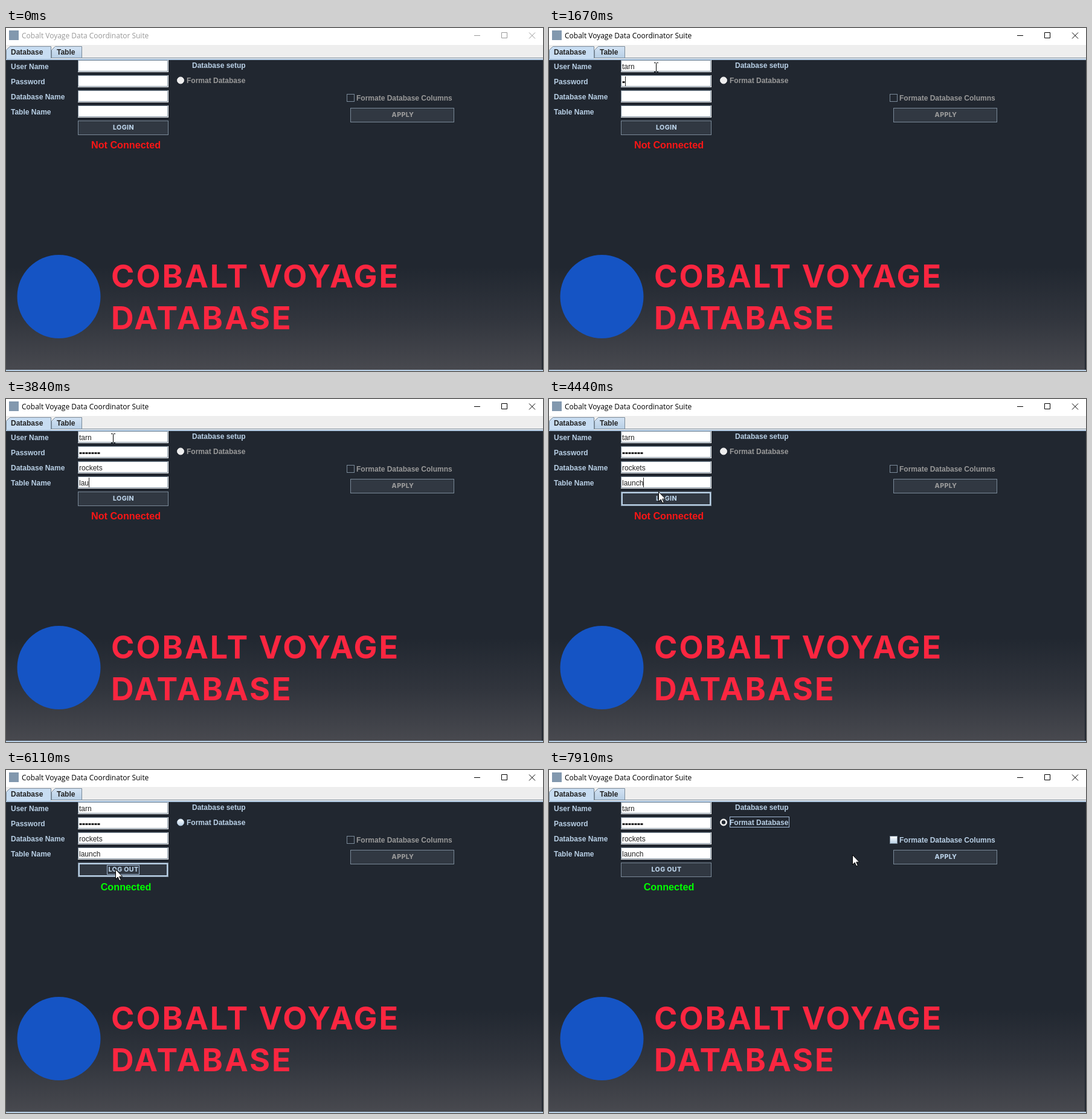
Animation of 889x567 px, one loop 7990 ms. Source, as an HTML page:

```html
<!DOCTYPE html>
<html lang="en">
<head>
<meta charset="utf-8">
<title>Database login</title>
<style>
html, body { margin: 0; width: 100%; height: 100%; overflow: hidden; background: #212730; }
svg { display: block; width: 889px; height: 567px; font: bold 12px "Liberation Sans", Arial, sans-serif; }
text { white-space: pre; }
.title { font: 12px "Open Sans", "Noto Sans", sans-serif; }
.label { fill: #b8cfe5; }
.input { font-weight: normal; fill: #222; }
.status { font-size: 16.2px; text-anchor: middle; }
.face { font: 800 10.6px Inter, sans-serif; letter-spacing: .4px; text-anchor: middle; fill: #b8cfe5; }
.brand { font: 700 52px Inter, sans-serif; letter-spacing: 3px; fill: #fb2640; }
.line { fill: none; stroke: #7a8a99; }
.ring { fill: none; stroke: #a3bad6; }
.box { fill: #313842; stroke: #7a8a99; }
.off { fill: #999; }
</style>
</head>
<body>
<svg viewBox="0 0 889 567">
  <defs>
    <linearGradient id="floor" x1="0" y1="0" x2="0" y2="1">
      <stop offset="0" stop-color="#212730"/><stop offset=".5" stop-color="#31353d"/><stop offset="1" stop-color="#48494f"/>
    </linearGradient>
    <linearGradient id="tab" x1="0" y1="0" x2="0" y2="1">
      <stop offset="0" stop-color="#d3e3f4"/><stop offset="1" stop-color="#b8cfe5"/>
    </linearGradient>
    <linearGradient id="knob" x1="0" y1="0" x2="0" y2="1">
      <stop offset="0" stop-color="#fff"/><stop offset="1" stop-color="#b8cfe5"/>
    </linearGradient>
  </defs>

  <!-- window frame -->
  <rect width="889" height="28" fill="#fff"/>
  <rect x="5" y="4" width="16" height="16" fill="#8298ae"/>
  <g id="chrome">
    <text class="title" x="26" y="17" fill="currentColor">Cobalt Voyage Data Coordinator Suite</text>
    <path d="M775 12.5h10M820.5 7.5h9v9h-9zM866 7.5l10 10M876 7.5l-10 10" fill="none" stroke="currentColor"/>
  </g>

  <!-- tabs -->
  <rect y="28" width="889" height="25" fill="#eee"/>
  <path d="M75.5 49.5V36.5l6-6h44v19z" fill="url(#tab)" stroke="#7a8a99"/>
  <rect y="50" width="889" height="1" fill="#fff"/>
  <rect x="75" y="49" width="814" height="1" fill="#7a8a99"/>
  <rect y="51" width="889" height="2" fill="#a9c3de"/>
  <path d="M.5 51V36.5l6-6h68V51z" fill="#c8ddf2"/>
  <path class="line" d="M.5 51V36.5l6-6h68V50"/>
  <text x="8" y="44" fill="#222">Database</text>
  <text x="84" y="44" fill="#222">Table</text>

  <!-- panel -->
  <rect y="53" width="889" height="514" fill="#212730"/>
  <rect y="395" width="887" height="170" fill="url(#floor)"/>
  <rect y="565" width="889" height="2" fill="#b8cfe5"/>
  <circle cx="87.5" cy="444" r="69" fill="#1554c4"/>
  <text class="brand" x="174" y="429">COBALT VOYAGE</text>
  <text class="brand" x="174" y="498">DATABASE</text>

  <g id="form"></g>
  <path id="dots" fill="none" stroke="#222" stroke-width="3" stroke-dasharray="4 1"/>
  <rect id="caret" width="1" height="16" fill="#222"/>

  <g>
    <rect id="login" class="box" x="119.5" y="153.5" width="149" height="23"/>
    <g id="glow" fill="none">
      <rect x="121" y="155" width="146" height="20" stroke="#b8cfe5" stroke-width="2"/>
    </g>
    <text id="loginText" class="face" x="194.5" y="168"></text>
    <rect id="loginRing" class="ring" y="157.5" height="15"/>
  </g>
  <text id="status" class="status" x="198.5" y="199"></text>

  <!-- database setup -->
  <text class="label" x="308" y="66">Database setup</text>
  <circle id="radio" cx="289" cy="86.5" r="5.5" stroke="#eee"/>
  <circle id="mark" cx="289" cy="86.5" r="3.2" fill="#212730"/>
  <text id="radioText" x="299" y="91">Format Database</text>
  <rect id="radioRing" class="ring" x="299.5" y="77.5" width="98" height="17"/>
  <rect id="check" x="564.5" y="109.5" width="12" height="12" stroke="#7a8a99"/>
  <text id="checkText" x="580" y="120">Formate Database Columns</text>
  <rect class="box" x="570.5" y="132.5" width="171" height="23"/>
  <text id="apply" class="face" x="657" y="147">APPLY</text>

  <!-- pointer -->
  <g id="pointer">
    <circle id="halo" r="12.3" fill="#fff000" opacity=".72"/>
    <path id="arrow" d="M.5.5v16l3.7-3.5 2.6 6 2.5-1.1-2.6-5.7h5z" fill="#fff" stroke="#000"/>
    <path id="beam" d="M-3-7.5h2.5l1 1 1-1H4M.5-6.5v13M-3 7.5h2.5l1-1 1 1H4" fill="none" stroke="#000"/>
  </g>
</svg>
<script>
const LOOP = 7990;
const el = id => document.getElementById(id);
const show = (id, on) => el(id).setAttribute('visibility', on ? 'visible' : 'hidden');
const set = (id, attrs) => { for (const k in attrs) el(id).setAttribute(k, attrs[k]); };
const between = (t, a, b) => t >= a && t < b;

const rowTop = i => 53 + 25 * i;
el('form').innerHTML = ['User Name', 'Password', 'Database Name', 'Table Name'].map((name, i) => `
  <text class="label" x="8" y="${rowTop(i) + 15}">${name}</text>
  <rect x="119" y="${rowTop(i)}" width="150" height="20" fill="#fff"/>
  <rect class="line" x="119.5" y="${rowTop(i) + .5}" width="148" height="18"/>
  <text class="input" id="field${i}" x="121" y="${rowTop(i) + 15}"></text>`).join('');

// Key times for each typed field; the value is how many characters are in by then.
const typing = [
  { text: 'tarn', keys: [[1000, 1], [1060, 2], [1130, 3], [1200, 4]] },
  { text: '', keys: [[1670, 1], [1740, 2], [1870, 3], [2020, 4], [2080, 5], [2220, 6], [2290, 7]] },
  { text: 'rockets', keys: [[2760, 1], [2820, 3], [2890, 4], [2960, 6], [3380, 7]] },
  { text: 'launch', keys: [[3770, 2], [3840, 3], [3910, 4], [3980, 6]] }
];
// Field that shows the caret, -1 for none.
const caretAt = [[650, 0], [1340, 1], [1530, -1], [1670, 1], [2420, 2], [2560, -1], [2620, 2],
  [3100, -1], [3240, 2], [3500, 3], [4460, -1]];
const path = [[140, 1, 109], [560, 177, 65], [4130, 177, 65], [4520, 181, 164], [6710, 181, 164],
  [7360, 288, 87], [7839, 288, 87], [7840, 420, 120], [7910, 502, 140]];
const clicks = [[650, 860], [4720, 4840], [7430, 7560]];

function stepAt(list, t, start) {
  let value = start;
  for (const [time, v] of list) if (t >= time) value = v;
  return value;
}

function pointerAt(t) {
  const next = path.findIndex(p => p[0] > t);
  if (next < 0) return path[path.length - 1].slice(1);
  if (next === 0) return path[0].slice(1);
  const [a, b] = [path[next - 1], path[next]];
  const u = (t - a[0]) / (b[0] - a[0]);
  const e = u * u * (3 - 2 * u);
  return [1, 2].map(k => a[k] + (b[k] - a[k]) * e);
}

function drawFields(t) {
  const counts = typing.map(f => stepAt(f.keys, t, 0));
  typing.forEach((f, i) => { el('field' + i).textContent = f.text.slice(0, counts[i]); });
  set('dots', { d: `M121.5 89.5h${Math.max(0, 5 * counts[1] - 1)}` });
  show('dots', counts[1] > 0);
  const row = stepAt(caretAt, t, -1);
  show('caret', row >= 0);
  if (row < 0) return;
  const width = row === 1 ? 5 * counts[1] : el('field' + row).getComputedTextLength();
  set('caret', { x: 121 + Math.round(width), y: rowTop(row) + 2 });
}

function drawLogin(t, hover) {
  const pressed = between(t, 4720, 6110);
  const online = t >= 6110;
  set('login', { style: pressed ? 'fill:#b8cfe5' : '' });
  show('glow', hover && !pressed);
  show('loginText', !pressed);
  el('loginText').textContent = online ? 'LOG OUT' : 'LOGIN';
  show('loginRing', between(t, 4720, 7430));
  set('loginRing', online ? { x: 167.5, width: 53 } : { x: 174.5, width: 39 });
  el('status').textContent = online ? 'Connected' : 'Not Connected';
  set('status', { fill: online ? '#00ff00' : '#fa1616' });
}

function drawSetup(t) {
  const online = t >= 6110, chosen = t >= 7560;
  set('radio', { fill: online && !chosen ? 'url(#knob)' : '#eee', stroke: online && !chosen ? '#b8cfe5' : '#eee' });
  show('mark', chosen);
  set('radioText', { class: online ? 'label' : 'off' });
  show('radioRing', t >= 7430);
  set('check', { fill: chosen ? 'url(#knob)' : '#212730' });
  set('checkText', { class: chosen ? 'label' : 'off' });
  set('apply', { style: chosen ? '' : 'fill:#999' });
}

function draw(t) {
  const [x, y] = pointerAt(t);
  const inColumn = between(x, 119, 269);
  const overField = inColumn && between(y, 53, 148) && (y - 53) % 25 < 20;
  el('chrome').style.color = t < 650 ? '#999' : '#000';
  drawFields(t);
  drawLogin(t, inColumn && between(y, 153, 177));
  drawSetup(t);
  set('pointer', { transform: `translate(${Math.round(x)} ${Math.round(y)})` });
  const visible = t >= 140;
  show('arrow', visible && !overField);
  show('beam', visible && overField);
  show('halo', clicks.some(([a, b]) => between(t, a, b)));
}

const start = performance.now();
function tick() {
  draw((performance.now() - start) % LOOP);
  requestAnimationFrame(tick);
}
tick();
</script>
</body>
</html>
```
